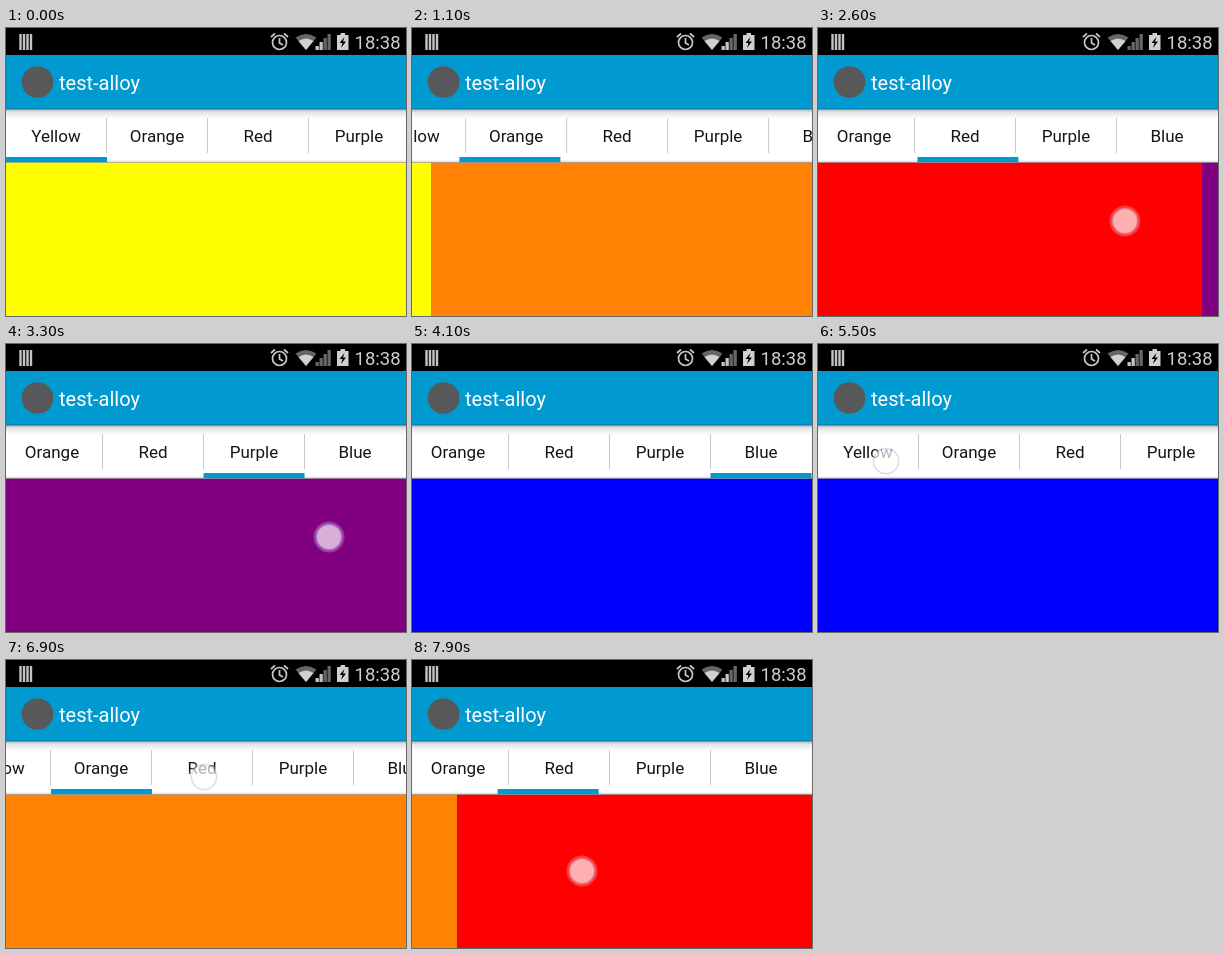
These frames come from a looping animation (400x288 px, 8000 ms). An HTML page:

```html
<!DOCTYPE html>
<html lang="en">
<head>
<meta charset="utf-8">
<title>Swipe tabs</title>
<style>
  html, body { margin: 0; width: 100%; height: 100%; overflow: hidden; background: #000; }
  svg { display: block; width: 100%; height: 100%; font-family: Roboto, sans-serif; }
</style>
</head>
<body>
<svg viewBox="0 0 400 288">
  <defs>
    <linearGradient id="shade" x2="0" y2="1">
      <stop offset="0" stop-color="#000" stop-opacity=".3"/>
      <stop offset=".35" stop-color="#000" stop-opacity=".1"/>
      <stop offset="1" stop-color="#000" stop-opacity="0"/>
    </linearGradient>
    <clipPath id="strip"><rect y="81" width="400" height="54"/></clipPath>
  </defs>

  <g id="pages"></g>

  <g clip-path="url(#strip)">
    <rect y="81" width="400" height="53.5" fill="#fff"/>
    <g id="tabs" font-size="17" fill="#151515" text-anchor="middle"></g>
    <rect y="132.5" width="400" height="2" fill="#000" opacity=".1"/>
    <rect id="mark" y="129" width="101" height="5.2" fill="#0099d0"/>
    <rect y="81" width="400" height="10" fill="url(#shade)"/>
  </g>

  <rect y="27" width="400" height="54" fill="#0099d0"/>
  <rect y="80" width="400" height="1.5" fill="#0088ba"/>
  <circle cx="31.5" cy="54" r="15.8" fill="#56585a"/>
  <text x="53" y="62" font-size="20" fill="#fff">test-alloy</text>

  <rect width="400" height="27" fill="#000"/>
  <path d="M14.5 6V22M18 6V22M21.5 6V22M25 6V22" stroke="#c4c4c4" stroke-width="2.4"/>
  <g fill="none" stroke="#c8c8c8" stroke-width="1.7">
    <circle cx="273.5" cy="14.5" r="7"/>
    <path d="M273.5 10V15L277 17M265 9L269 5.5M282 9L278 5.5"/>
  </g>
  <path d="M300 22L289.5 9.5Q300 2.500 310.500 9.500Z" fill="#666"/>
  <path d="M300 22L292.500 13Q300 8 307.500 13Z" fill="#d0d0d0"/>
  <g id="signal"></g>
  <path d="M334.500 5H339V7H342.500V22H331V7H334.500Z" fill="#d0d0d0"/>
  <path d="M338.500 9L333.500 15H336.500L335 20L340 13.500H337Z" fill="#000"/>
  <text x="348.500" y="21" font-size="18.500" fill="#cdcdcd">18:38</text>

  <g id="touch" fill="#fff">
    <circle r="15.500" opacity=".22"/>
    <circle r="12" opacity=".6"/>
    <circle r="12.600" fill="none" stroke="#b8b8e4" stroke-width="1.500" opacity=".5"/>
  </g>
</svg>
<script>
const LOOP = 8000, STEP = 100, W = 400, TAB = 101;
const NAMES = ['Yellow', 'Orange', 'Red', 'Purple', 'Blue'];
const COLORS = ['#ffff00', '#ff8205', '#ff0000', '#800080', '#0000ff'];
const $ = id => document.getElementById(id);
const clamp = (v, lo, hi) => Math.min(hi, Math.max(lo, v));

function add(parent, tag, attrs, text) {
  const el = document.createElementNS('http://www.w3.org/2000/svg', tag);
  for (const k in attrs) el.setAttribute(k, attrs[k]);
  if (text) el.textContent = text;
  parent.append(el);
  return el;
}

// Linear track through [time, value] points
function track(points, t) {
  if (t <= points[0][0]) return points[0][1];
  for (let i = 1; i < points.length; i++) {
    const [t0, v0] = points[i - 1], [t1, v1] = points[i];
    if (t < t1) return v0 + (v1 - v0) * (t - t0) / (t1 - t0);
  }
  return points[points.length - 1][1];
}

NAMES.forEach((name, i) => {
  add($('pages'), 'rect', { x: i * W, y: 134.5, width: W + 0.5, height: 154, fill: COLORS[i] });
  add($('tabs'), 'text', { x: 50 + i * TAB, y: 114 }, name);
  if (i < 4) add($('tabs'), 'rect', { x: 100 + i * TAB, y: 90, width: 1, height: 35, fill: '#c8c8c8' });
});
const bars = [0, 1, 2, 3].map(i =>
  add($('signal'), 'rect', { x: 309.5 + i * 4, y: 18 - i * 4, width: 3.3, height: 4 + i * 4 }));

// Swipes: time of touch and time the finger starts to move
const SWIPES = [[500, 500], [1400, 1400], [2300, 2500], [3300, 3300]];
const SWIPE = [[0, 0], [100, 0.04], [200, 0.22], [300, 0.55], [400, 0.845],
  [500, 0.905], [600, 0.9525], [700, 0.988], [800, 1]];
// Taps on tabs: time, x, page before, page after
const TAPS = [[5500, 68, 4, 0], [6200, 150, 0, 1], [6900, 198, 1, 2]];
const BACK = [[7700, 2], [7800, 1.965], [7860, 1.8875]];
const PULL = [[4200, 0], [4400, 6], [5200, 105]];

function page(t) {
  if (t >= 7700) return track(BACK, t);
  for (const [start, , from, to] of [...TAPS].reverse()) {
    if (t >= start) {
      return from + (to - from) * track([[0, 0], [10, 0.93], [100, 0.97], [110, 1]], t - start);
    }
  }
  return SWIPES.reduce((sum, [, move]) => sum + track(SWIPE, t - move), 0);
}

// The tab strip trails the pages a little
function scroll(t) {
  if (t >= 4200 && t <= 5500) return 105 - track(PULL, t);
  return clamp(TAB * page(t - 90) - 45, 0, 105);
}

function touch(t) {
  for (const [down, move] of SWIPES) {
    if (t >= down && t < move + 350) return [323 - W * track(SWIPE, t - move), 193, 1];
  }
  if (t >= 4200 && t < 5400) {
    const k = (t - 4200) / 1000;
    return [110 + track(PULL, t) * 1.2, 74 + 28 * Math.min(k, 1), t < 5300 ? 1 : 0.5];
  }
  for (const [start, x] of TAPS) {
    if (t >= start && t < start + 200) return [x, 117, t < start + 100 ? 1 : 0.5];
  }
  if (t >= 7700) return [170 - W * (page(t) - 1.8875), 211, 1];
  return [0, 0, 0];
}

function draw(t) {
  const shift = scroll(t), [x, y, alpha] = touch(t);
  $('pages').setAttribute('transform', `translate(${-page(t) * W})`);
  $('tabs').setAttribute('transform', `translate(${-shift})`);
  $('mark').setAttribute('x', TAB * page(t - 40) - shift);
  $('touch').setAttribute('transform', `translate(${x} ${y})`);
  $('touch').setAttribute('opacity', alpha);
  const weak = t >= 1200 && t < 3500;
  bars.forEach((bar, i) => bar.setAttribute('fill', i < 2 && !weak ? '#c4c4c4' : '#666'));
}

const begin = performance.now();
function frame() {
  const t = (performance.now() - begin) % LOOP;
  draw(Math.floor(t / STEP) * STEP);
  requestAnimationFrame(frame);
}
frame();
</script>
</body>
</html>
```
